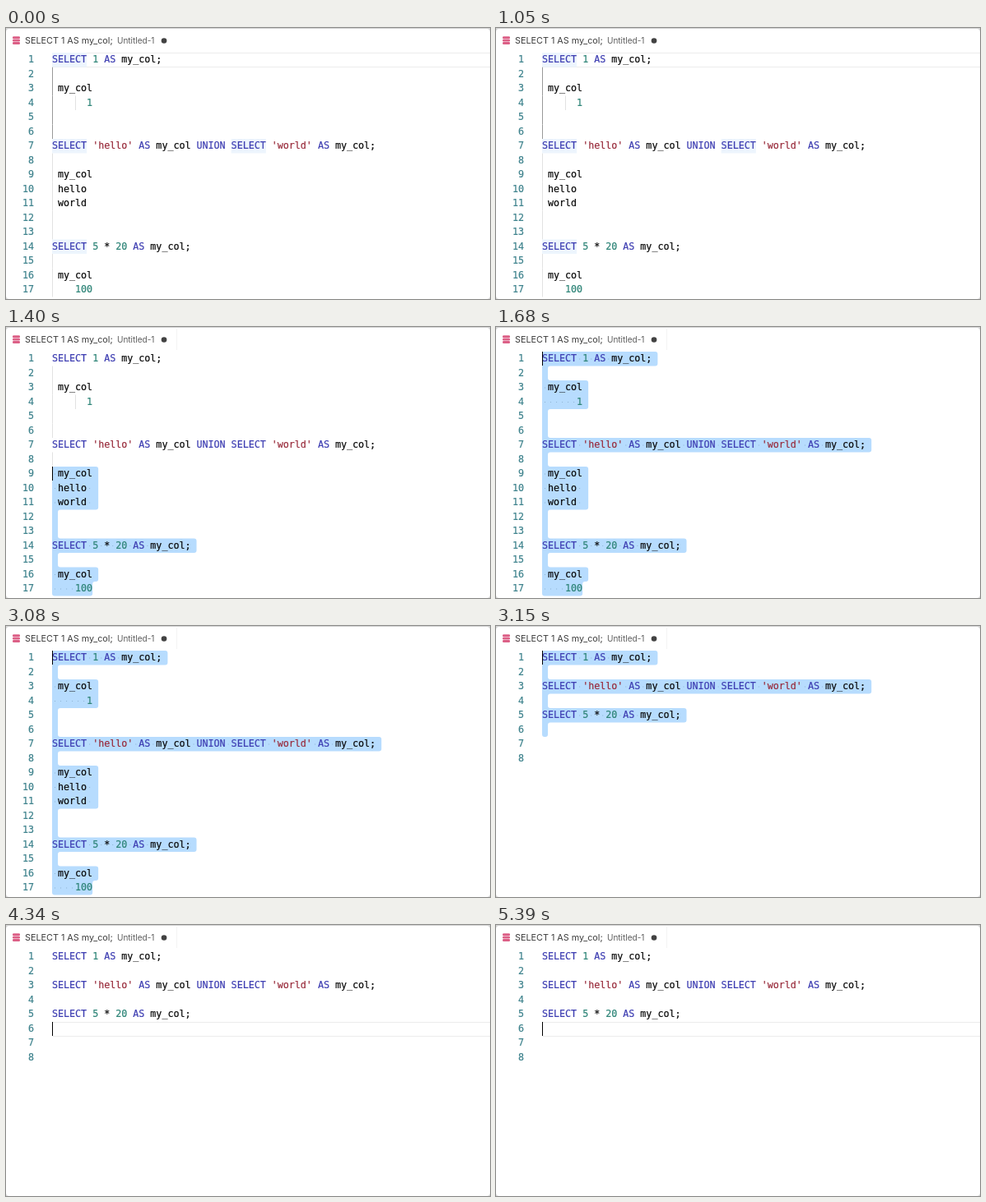
These frames come from a looping animation (588x330 px, 5.88 s). An HTML page with a canvas:

```html
<!DOCTYPE html>
<html lang="en">
<head>
<meta charset="utf-8">
<title>SQL editor</title>
<style>
html, body { margin: 0; width: 100%; height: 100%; overflow: hidden; background: #fff; }
canvas { display: block; }
</style>
</head>
<body>
<canvas id="stage" width="588" height="330"></canvas>
<script>
const ctx = document.getElementById('stage').getContext('2d');
const LOOP = 5880, STEP = 70;
const LEFT = 56, TOP = 30, CHAR = 7.02, ROW = 17.5;
const MONO = '11.66px "DejaVu Sans Mono", monospace';
const SANS = 'Inter, sans-serif';

const queries = [
  'SELECT 1 AS my_col;',
  "SELECT 'hello' AS my_col UNION SELECT 'world' AS my_col;",
  'SELECT 5 * 20 AS my_col;'
];
const withResults = [
  queries[0], '', ' my_col', '      1', '', '',
  queries[1], '', ' my_col', ' hello ', ' world ', '', '',
  queries[2], '', ' my_col', '    100'
];
const queriesOnly = [queries[0], '', queries[1], '', queries[2], '', '', ''];

const DRAG_START = 1120, CLEANED = 3150, DESELECTED = 4340;
const dragRows = [17, 16, 14, 12, 9, 6, 3, 1];
const caretOff = [[0, DRAG_START], [2170, 2660], [3710, 4200], [4830, 5390]];

const rowTop = row => TOP + (row - 1) * ROW;

function rect(color, x, y, w, h) {
  ctx.fillStyle = color;
  ctx.fillRect(x, y, w, h);
}

function text(str, x, y, color, font, align = 'left') {
  ctx.font = font;
  ctx.textAlign = align;
  ctx.fillStyle = color;
  ctx.fillText(str, x, y);
}

function stateAt(t) {
  const state = {
    lines: t < CLEANED ? withResults : queriesOnly,
    caret: !caretOff.some(([from, to]) => t >= from && t < to),
    idle: t < DRAG_START,
    row: 1, first: 0, last: 0
  };
  if (t >= DESELECTED) state.row = 6;
  else if (t >= DRAG_START) {
    const step = Math.floor((t - DRAG_START) / STEP);
    state.row = state.first = dragRows[Math.min(step, dragRows.length - 1)];
    state.last = t < CLEANED ? 17 : 6;
  }
  return state;
}

function drawWindow({ idle }) {
  rect('#d4d4d4', 0, 0, 588, 330);
  ctx.fillStyle = '#fff';
  ctx.beginPath();
  ctx.roundRect(0, 1, 588, 329, 4);
  ctx.fill();
  if (!idle) rect('#f3f3f3', 207, 2, 1, 26);

  ctx.fillStyle = '#dc5f86';
  for (let i = 0; i < 3; i++) {
    ctx.beginPath();
    ctx.roundRect(8, 10.3 + i * 3.4, 9, 2.9, 1.3);
    ctx.fill();
  }
  text('SELECT 1 AS my_col;', 23, 19, '#3c3c3c', '10.8px ' + SANS);
  text('Untitled-1', 135, 19, '#5c5c5c', '10px ' + SANS);
  ctx.fillStyle = '#424242';
  ctx.beginPath();
  ctx.arc(192, 15.5, 3.3, 0, 7);
  ctx.fill();
}

function drawCurrentLine(row) {
  const y = Math.round(rowTop(row));
  rect('#ececec', LEFT, y, 588 - LEFT, 1);
  rect('#ececec', LEFT, y + 17, 588 - LEFT, 1);
}

function drawGuides({ lines, first, last, idle }) {
  if (lines !== withResults) return;
  lines.forEach((line, i) => {
    const row = i + 1;
    if (line.startsWith('SELECT') || (row >= first && row <= last)) return;
    rect(idle && row < 7 ? '#999' : '#e2e2e2', LEFT, rowTop(row), 1, ROW);
    if (row === 4) rect('#e2e2e2', LEFT + 28, rowTop(row), 1, ROW);
  });
}

function drawWordMatches(lines) {
  lines.forEach((line, i) => {
    for (const match of line.matchAll(/SELECT/g))
      rect('#edf5fd', LEFT + match.index * CHAR, rowTop(i + 1), 6 * CHAR, ROW);
  });
}

// One outline down the stepped right edge rounds both inner and outer corners.
function drawSelection({ lines, first, last }) {
  const corners = [];
  for (let row = first; row <= last; row++) {
    const newline = row < lines.length ? 1 : 0;
    const x = LEFT + (lines[row - 1].length + newline) * CHAR;
    corners.push([x, rowTop(row)], [x, rowTop(row + 1)]);
  }
  corners.push([LEFT, rowTop(last + 1)], [LEFT, rowTop(first)]);
  ctx.beginPath();
  ctx.moveTo(LEFT + 3, rowTop(first));
  corners.forEach(([x, y], i) => {
    const [nextX, nextY] = corners[i + 1] || [LEFT + 3, y];
    ctx.arcTo(x, y, nextX, nextY, 3);
  });
  ctx.closePath();
  ctx.fillStyle = '#b7dcfe';
  ctx.fill();

  for (let row = first; row <= last; row++)
    [...lines[row - 1]].forEach((char, col) => {
      if (char === ' ')
        rect('#8fb3d3', LEFT + (col + 0.5) * CHAR - 0.5, rowTop(row) + 8.5, 1, 1);
    });
}

function codeText(str, x, y, color, align) {
  text(str, x, y, color, MONO, align);
  ctx.strokeStyle = color;
  ctx.lineWidth = 0.2;
  ctx.strokeText(str, x, y);
}

function drawCode(lines) {
  const token = /('\w+')|\b(SELECT|AS|UNION)\b|\b(\d+)\b|\S+/g;
  lines.forEach((line, i) => {
    const y = rowTop(i + 1) + 12.2;
    codeText(i + 1, 34, y, '#3f838d', 'right');
    for (const match of line.matchAll(token)) {
      const [word, string, keyword, number] = match;
      const color = string ? '#982a3a' : keyword ? '#3e3eb2' : number ? '#2f8578' : '#0a0a0a';
      codeText(word, LEFT + match.index * CHAR, y, color);
    }
  });
}

function draw() {
  const state = stateAt(performance.now() % LOOP);
  drawWindow(state);
  if (!state.last) drawCurrentLine(state.row);
  drawGuides(state);
  if (state.idle) drawWordMatches(state.lines);
  if (state.last) drawSelection(state);
  drawCode(state.lines);
  if (state.caret) rect('#000', LEFT, Math.round(rowTop(state.row)), 1, 17);
  requestAnimationFrame(draw);
}
draw();
</script>
</body>
</html>
```
